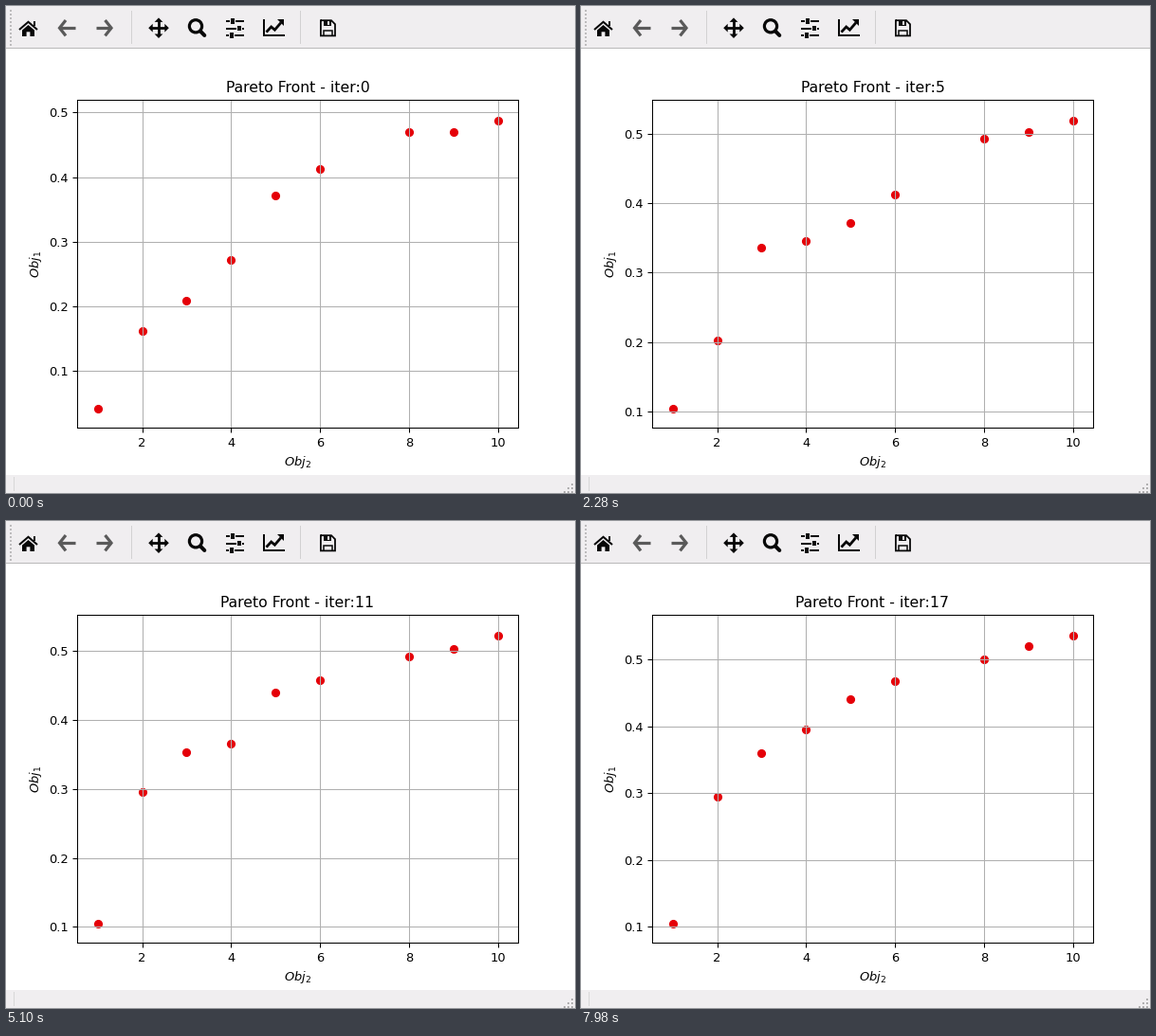
Recreate the animation shown at these times as a matplotlib script. Size 600 by 514 pixels, loop 8000 ms.

```python
import matplotlib.pyplot as plt
import numpy as np
from matplotlib.animation import FuncAnimation
from matplotlib.patches import Circle, Polygon, Rectangle

W, H, DPI = 600, 514, 93.75
LOOP, INTERVAL = 8000, 40
PX = 72 / DPI  # points per pixel
PANEL, INK, MUTED = "#f0eef0", "#080808", "#5a5a5a"

START = {1: .0421, 2: .1623, 3: .2092, 4: .2714, 5: .3718,
         6: .4121, 8: .470, 9: .470, 10: .4876}
# Improvements found in each iteration: {iteration: {obj2: obj1}}
UPDATES = {
    1: {1: .1052, 8: .4925},
    2: {3: .295, 9: .4974},
    3: {2: .2024},
    4: {4: .3455, 9: .5024, 10: .5085},
    5: {3: .3366, 10: .518},
    6: {4: .3658, 5: .4052, 6: .4339},
    7: {2: .295},
    8: {10: .522},
    9: {3: .354},
    10: {5: .4405},
    11: {6: .4577},
    12: {3: .3597, 4: .3904},
    13: {8: .4948, 9: .514},
    14: {8: .5003},
    15: {6: .4677},
    16: {9: .5208, 10: .5357},
    17: {4: .396},
}

plt.rcParams["font.family"] = "DejaVu Sans"
plt.rcParams["toolbar"] = "None"
fig = plt.figure(figsize=(W / DPI, (H + .001) / DPI), dpi=DPI, facecolor="white")


# ---- window chrome, drawn in pixel coordinates ----
ui = fig.add_axes([0, 0, 1, 1], zorder=-1)
ui.set(xlim=(0, W), ylim=(H, 0))
ui.axis("off")


def rect(x, y, w, h, color=INK):
    ui.add_patch(Rectangle((x, y), w, h, fc=color, lw=0))


def shape(points, color=INK):
    ui.add_patch(Polygon(points, fc=color, lw=0))


def stroke(points, width, color=INK, cap="butt"):
    xs, ys = zip(*points)
    ui.plot(xs, ys, color=color, lw=width * PX, solid_capstyle=cap,
            solid_joinstyle="miter")


def home():
    stroke([(14, 25), (23.5, 16.8), (33, 25)], 2)
    rect(28.5, 16, 2.7, 5)
    shape([(17, 25.6), (23.5, 20), (30, 25.6), (30, 32), (25.4, 32),
           (25.4, 27.3), (21.6, 27.3), (21.6, 32), (17, 32)])


def arrow(tip, direction):
    back = tip - direction * 8
    stroke([(back, 15), (tip - direction * 1.5, 23.2), (back, 31.4)], 3.2, MUTED)
    stroke([(tip - direction * 2, 23.2), (tip - direction * 18, 23.2)], 3.2, MUTED)


def move(cx, cy):
    stroke([(cx - 8, cy), (cx + 8, cy)], 2.8)
    stroke([(cx, cy - 8), (cx, cy + 8)], 2.8)
    for dx, dy in ((1, 0), (-1, 0), (0, 1), (0, -1)):
        shape([(cx + dx * 10.8, cy + dy * 10.8),
               (cx + dx * 6.3 + dy * 4.4, cy + dy * 6.3 + dx * 4.4),
               (cx + dx * 6.3 - dy * 4.4, cy + dy * 6.3 - dx * 4.4)])


def magnifier():
    ui.add_patch(Circle((200, 21.3), 6.6, fill=False, ec=INK, lw=3.2 * PX))
    stroke([(205, 26.6), (209.3, 31)], 4, cap="round")


def sliders():
    for y, knob in ((16.3, 239), (23.7, 246), (31, 237.5)):
        rect(232, y - 1, 19, 2)
        rect(knob - 3, y - 2.8, 6, 5.6, PANEL)
        rect(knob - 2, y - 2.8, 4, 5.6)


def chart():
    stroke([(272, 14), (272, 31.5), (293.5, 31.5)], 2)
    stroke([(274.5, 27.6), (279.7, 22), (283.4, 25.2), (290, 17.5)], 2.8)
    shape([(286, 14.5), (292.5, 14.5), (292.5, 21)])


def floppy():
    stroke([(331.9, 15.2), (343, 15.2), (347, 19.2), (347, 31.4),
            (331.9, 31.4), (331.9, 14.4)], 1.8)
    rect(334.5, 15, 8, 5.8)
    rect(338.8, 16, 2, 3.6, PANEL)
    stroke([(335.2, 31), (335.2, 26), (343.8, 26), (343.8, 31)], 1.5)


rect(0, 0, W, 44, PANEL)
rect(0, 44, W, 1, "#b9b8b9")
rect(0, 495, W, 19, PANEL)
for y in range(4, 41, 4):
    rect(4, y, 2, 2, "#bdbcbd")
for x in (132, 310):
    rect(x, 5, 1, 35, "#d2d1d2")
rect(8, 497, 1, 15, "#d8d7d8")
for row in range(3):
    for col in range(row + 1):
        rect(596 - 4 * col, 504 + 4 * row - 0, 2, 2, "#b0afb0")

home()
arrow(55, -1)
arrow(112.5, 1)
move(161, 23.2)
magnifier()
sliders()
chart()
floppy()

# ---- plot ----
ax = fig.add_axes([75 / W, (H - 445.5) / H, 465 / W, 346.5 / H])
ax.set_xlim(.537, 10.457)
ax.set_xlabel("$Obj_2$")
ax.set_ylabel("$Obj_1$")
ax.grid(True)
title = ax.set_title("")
dots = ax.scatter(list(START), list(START.values()), color="#e50008")


def front(iteration):
    values = dict(START)
    for i in range(1, iteration + 1):
        values.update(UPDATES[i])
    return values


def update(frame):
    # The screen refreshes every 60 ms, an iteration takes about 482 ms.
    clock = (frame * INTERVAL + 20) // 60 * 60
    iteration = (clock + 306) // 482
    values = front(iteration)
    y = np.array(list(values.values()))
    margin = .05 * np.ptp(y)
    ax.set_ylim(y.min() - margin - .0078, y.max() + margin + .0097)
    dots.set_offsets(np.column_stack([list(values), y]))
    title.set_text(f"Pareto Front - iter:{iteration}")
    return dots, title


anim = FuncAnimation(fig, update, frames=LOOP // INTERVAL, interval=INTERVAL,
                     init_func=lambda: update(0), repeat=True, repeat_delay=0)
plt.show()
```
